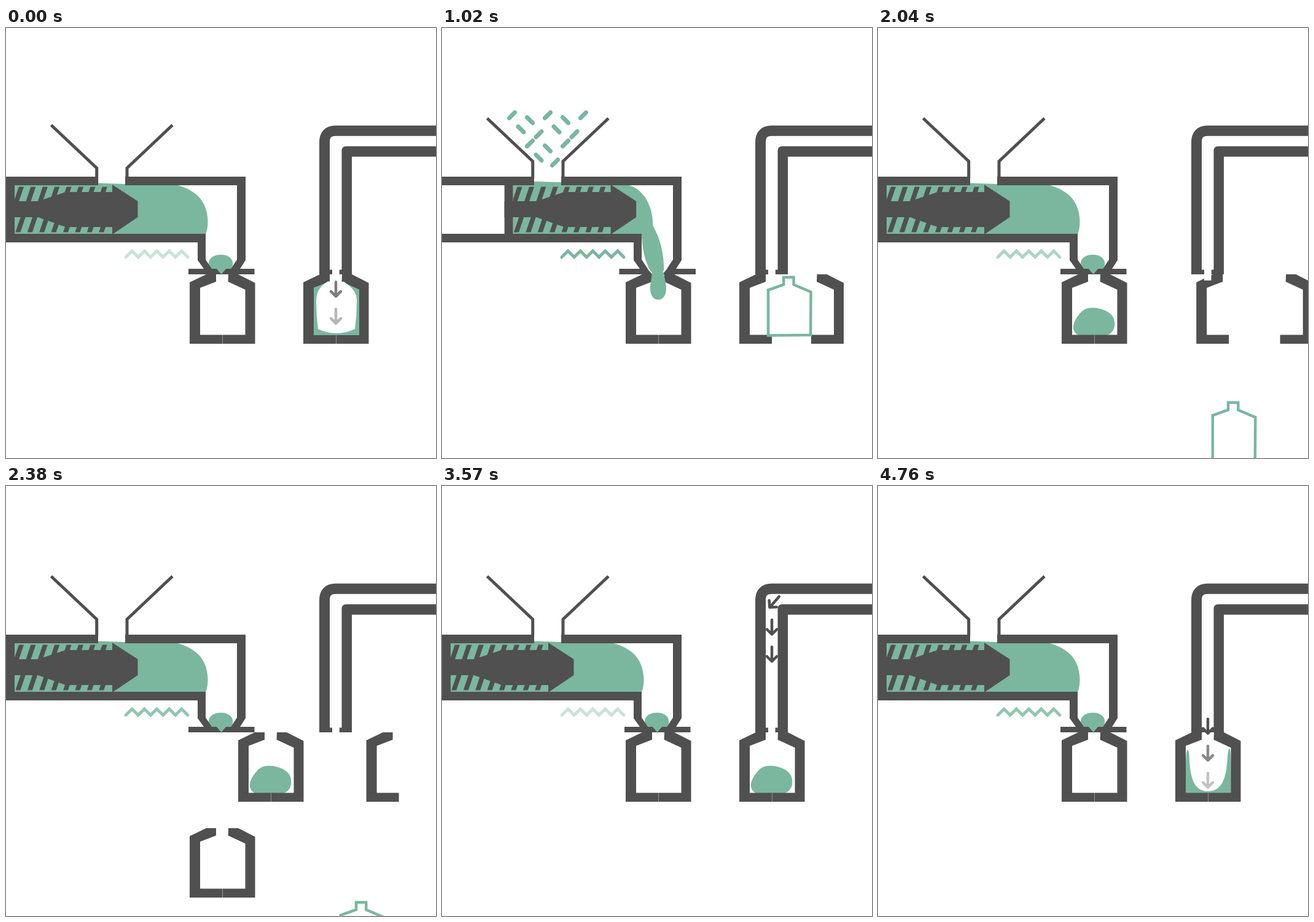
These frames come from a looping animation (700x700 px, 4930 ms). An HTML page with a canvas:

```html
<!DOCTYPE html>
<html lang="en">
<head>
<meta charset="utf-8">
<title>Blow moulding</title>
<style>
  html, body { margin: 0; width: 100%; height: 100%; overflow: hidden; background: #fff; }
  canvas { display: block; width: 700px; height: 700px; }
</style>
</head>
<body>
<canvas id="stage" width="700" height="700"></canvas>
<script>
const ctx = document.getElementById('stage').getContext('2d');
const DARK = '#505050', GREEN = '#7ab79e';
const STEP = 170, STEPS = 29;
const PITCH = 185; // distance between the two stations

const clamp = (v, lo = 0, hi = 1) => Math.max(lo, Math.min(hi, v));
const ramp = (n, from, to) => clamp((n - from) / (to - from));
const after = (n, from) => Math.max(0, n - from);
const mix = (a, b, k) => a + (b - a) * k;
const blend = (a, b, k) => a.map((v, i) => mix(v, b[i], k));

function fill(d, color) {
  ctx.fillStyle = color;
  ctx.fill(new Path2D(d));
}

function stroke(d, color, width, cap = 'butt', join = 'miter') {
  ctx.strokeStyle = color;
  ctx.lineWidth = width;
  ctx.lineCap = cap;
  ctx.lineJoin = join;
  ctx.stroke(new Path2D(d));
}

function scoped(draw) {
  ctx.save();
  draw();
  ctx.restore();
}

function shifted(x, y, draw) {
  scoped(() => {
    ctx.translate(x, y);
    draw();
  });
}

// Scales around a fixed point.
function scaled(x, y, sx, sy, draw) {
  scoped(() => {
    ctx.translate(x, y);
    ctx.scale(sx, sy);
    ctx.translate(-x, -y);
    draw();
  });
}

function clipped(x, y, w, h, draw) {
  scoped(() => {
    ctx.beginPath();
    ctx.rect(x, y, w, h);
    ctx.clip();
    draw();
  });
}

// ---- motion, in steps ----
const screwX = n => n < 12 ? 102.1 * Math.sin(Math.PI * (n / 12) ** 1.09) : 0;
const opening = n => 83 * ramp(n, 2.75, 7);
const leaving = n => 34.2 * after(n, 11);
const carried = n => Math.min(PITCH, 39.5 * after(n, 12));
const rising = n => 9.75 * after(18, n) ** 2;
const dropping = n => 34 * after(n, 5.95);
const gateGap = n => n > 4 && n < 11 ? 8.5 : 0;
const airLead = n => Math.min(274, 45 + 45.8 * (n - 16)) + 34.2 * after(n, 22);
const pelletFall = n => 17.5 * (n - 4) - 12 * after(4, n) ** 2;

// ---- melt front: top edge, nose, foot, and back to the barrel corner ----
const FULL = [278, 255.5, 305, 263, 321, 277, 326, 297, 330, 313, 329, 325, 325, 336, 325, 336, 325, 336, 325, 336];
const PUSHED = [345, 255.5, 365, 256, 376, 275, 376, 297, 376, 342, 369, 364, 362, 378, 336, 378, 329, 366, 325, 350];
const POURED = [285, 255.5, 308, 262, 330, 290, 330, 332, 349, 348, 358, 372, 361, 402, 342, 405, 329, 385, 326, 355];

function melt(n, off) {
  let p = blend(FULL, PUSHED, ramp(n, 0, 4));
  p = blend(p, POURED, Math.sqrt(ramp(n, 4, 8)));
  p = blend(p, FULL, ramp(n, 8, 12));
  const top = 252.5 - 2.5 * off / 90;
  fill(`M${14 + off} 255H150V${top}L195 ${top + 1.5}L${p.slice(0, 2)}C${p.slice(2, 8)}C${p.slice(8, 14)}` +
    `L${p.slice(14, 16)}C${p.slice(16, 20)},325,336H${14 + off}Z`, GREEN);
}

function screw(off) {
  shifted(off, 0, () => {
    fill('M0 255H14V336H0Z', DARK);
    fill('M0 282H52L97 267H173V255L214.5 282V308L173 336V324H97L52 308H0Z', DARK);
    clipped(14, 255, 159, 81, () => {
      for (let i = 0; i < 9; i++) fill(`M${21 + 19.4 * i} 258.5h8l-25 74h-8Z`, DARK);
    });
  });
}

// Rows of 5, 4, 3 and 2 pellets that the funnel squeezes together.
function pellets(n) {
  if (n < 1 || n > 11) return;
  clipped(0, 0, 400, 253, () => {
    for (let row = 0; row < 4; row++) {
      const count = 5 - row;
      for (let i = 0; i < count; i++) {
        const y = 107 + 23 * row + 8 * (i % 2) + pelletFall(n);
        const room = 12 + 1.03 * after(217, y);
        const x = 172 + clamp(29 * (i - (count - 1) / 2), -room, room);
        const lean = (i + row) % 2 ? -4.5 : 4.5;
        stroke(`M${x - 4.5} ${y + lean}L${x + 4.5} ${y - lean}`, GREEN, 7, 'round');
      }
    }
  });
}

function funnel(n) {
  shifted(0, n === 0 ? 11 : 0, () => {
    stroke('M73.5 147L147.7 217V244M271 147L197 217V244', DARK, 5);
  });
}

// Triangle wave in five levels.
function heat(n) {
  const period = 10.3, phase = (n + 15.2) % period;
  const level = 1 - 1.2 * Math.min(phase, period - phase) / period;
  let d = 'M195 373';
  for (let i = 1; i <= 10; i++) d += `l10.1 ${i % 2 ? -10 : 10}`;
  ctx.globalAlpha = Math.round(level * 5) / 5;
  stroke(d, GREEN, 5, 'round');
  ctx.globalAlpha = 1;
}

function nozzle(n) {
  if (gateGap(n)) return;
  const y = n > 4 ? 369 : mix(369, 374, ramp(n, 0, 4));
  fill(`M334 392C325 382 332 ${y} 350 ${y}C367 ${y} 374 382 366 392L358 392L350.5 402L343 392Z`, GREEN);
}

function barrel() {
  fill('M0 242H150V256H0Z', DARK);
  fill('M194 242H390V378L381 392H366L376 377V256H194Z', DARK);
  fill('M0 335H325V377L335 392H322L312 378V349H0Z', DARK);
}

function gate(n) {
  const g = gateGap(n);
  shifted(-g, 0, () => fill('M297 392H343L350.5 401H297Z', DARK));
  shifted(g, 0, () => fill('M404.5 392H358L350.5 401H404.5Z', DARK));
}

// ---- mould and its contents, in second-station coordinates ----
function mould(dx, dy, open = 0) {
  shifted(dx, dy, () => {
    fill('M484 414L511 401H527V413L501 423V499.5H537V514H484Z', DARK);
    shifted(open, 0, () => fill('M547 401H563L590.5 415V514H537.4V499.5H574.5V426L546.5 413Z', DARK));
  });
}

const BLOB = [511, 500, 502, 495, 500, 486, 507, 474, 518, 457, 524, 455, 537, 455.5,
  554, 457, 569, 465, 570, 478, 572, 490, 565, 498, 558, 500];
const CUP = [501, 500, 501, 475, 500, 429, 504, 429.5, 511, 431, 499, 497, 537, 497,
  576, 497, 565, 434, 572, 427, 575, 426, 575, 475, 575, 500];

function blob(n, dx) {
  if (n < 9) return;
  const size = Math.sqrt(ramp(n, 7, 11));
  const p = blend(BLOB, CUP, ramp(n, 23, 28));
  shifted(dx, 0, () => scaled(537, 500, size, size, () => {
    fill(`M${p.slice(0, 2)}C${p.slice(2)}Z`, GREEN);
  }));
}

function stream(n) {
  scaled(352, 385, 1 - ramp(n, 8, 10), ramp(n, 4, 8), () => {
    fill('M343 385C342 428 339 444 339 463C339 485 344 499.5 352 499.5' +
      'C360 499.5 365 485 365 463C365 444 361 420 358 385Z', GREEN);
  });
}

function bottle(n) {
  if (n === 0) {
    fill('M527 413L501 423V500H575V426L547 413Z', GREEN);
    fill('M524 412.5C512 420 505 428 505 445Q505 468 508 490Q538 504 568 490' +
      'Q571 468 571 445C571 430 565 424 550 413Z', '#fff');
    return;
  }
  shifted(41.3 * ramp(n, 4, 7), dropping(n), () => {
    stroke('M528.7 404H545V416L573 428L572.5 498L503.5 498.7V425L528.7 416Z', GREEN, 4.5);
  });
}

// ---- air pipe ----
function pipe() {
  stroke('M518.5 401V186Q518.5 167.3 537 167.3H700', DARK, 17);
  fill('M546.5 401V200Q546.5 192.5 554 192.5H700V209.5H563V401Z', DARK);
  fill('M526 393.5h5v7.5h-5ZM542.5 393.5h5v7.5h-5Z', DARK);
}

// d runs along the pipe and equals y on the way down.
function arrow(d) {
  if (d > 492) return;
  const bend = 184.5;
  const turn = ramp(d, bend - 18, bend + 18);
  const cut = Math.sin(turn * Math.PI);
  shifted(537 + after(bend, d) + 4 * cut, Math.max(bend, d) + 3 * cut, () => {
    ctx.rotate((1 - turn) * Math.PI / 2);
    ctx.globalAlpha = clamp(1 - (d - 391) / 135);
    stroke('M0 -12V11M-8 3.5L0 11.5L8 3.5', DARK, 4.5, 'round', 'round');
  });
}

function air(n) {
  const lead = airLead(n < 4 ? n + STEPS : n);
  for (let i = 0; i < 3; i++) arrow(lead - 44 * i);
}

function draw(n) {
  ctx.fillStyle = '#fff';
  ctx.fillRect(0, 0, 700, 700);

  const off = screwX(n), carry = carried(n) - PITCH;
  pellets(n);
  funnel(n);
  melt(n, off);
  nozzle(n);
  screw(off);
  barrel();
  gate(n);
  heat(n);

  pipe();
  if (n < 15) {
    mould(leaving(n), 0, opening(n));
    bottle(n);
    fill('M531 393H542.5V411H531Z', '#fff');
  } else {
    if (n < 19) mould(leaving(n), 0, opening(n));
  }
  blob(n, carry);
  mould(carry, 0);
  if (n > 12) mould(-PITCH, rising(n));
  stream(n);
  air(n);
}

const start = performance.now();
function tick() {
  draw(Math.floor((performance.now() - start) / STEP) % STEPS);
  requestAnimationFrame(tick);
}
tick();
</script>
</body>
</html>
```
